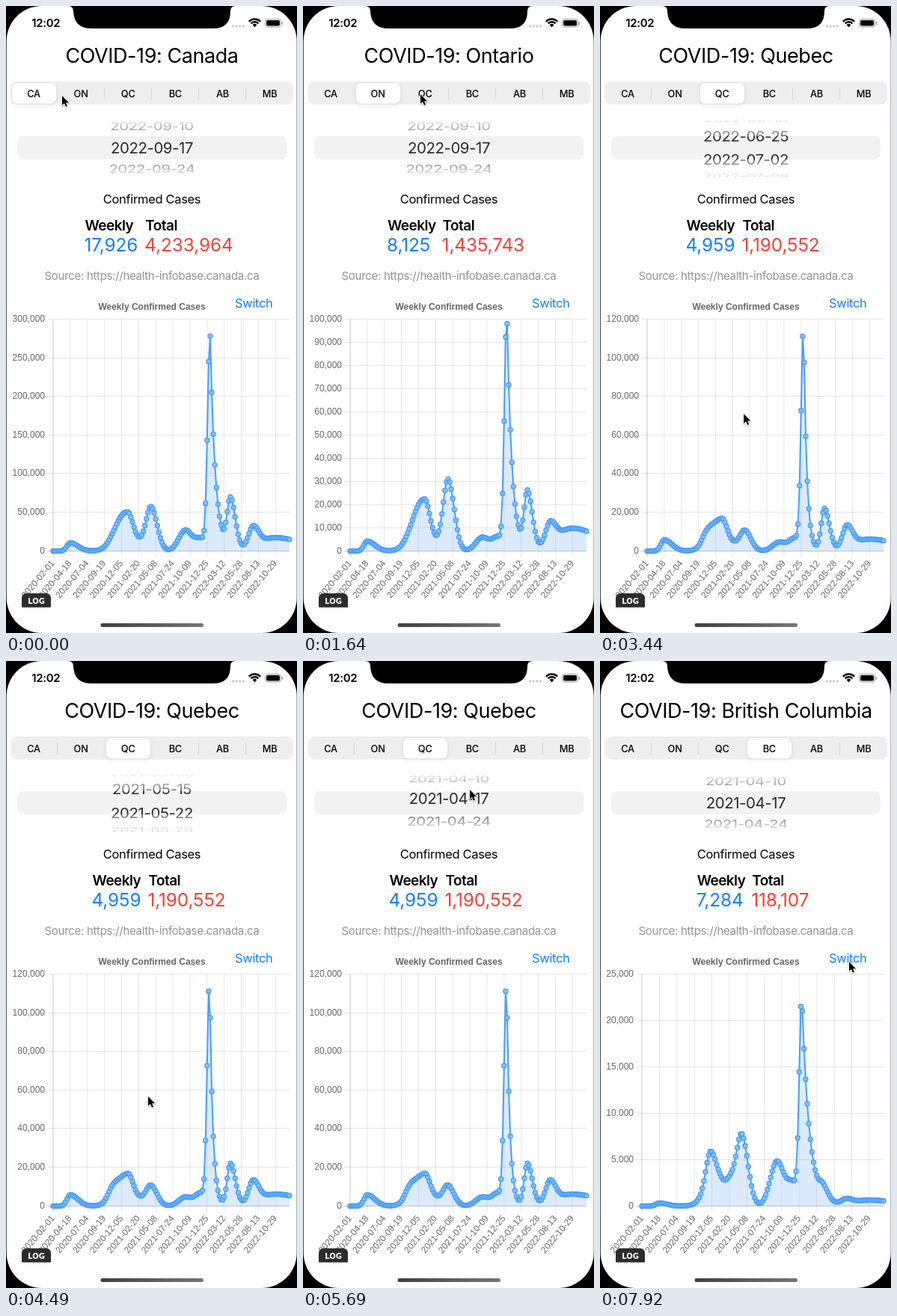
An HTML page with a canvas for the animation above (8 s loop, 389 by 838 pixels).

```html
<!DOCTYPE html>
<html lang="en">
<head>
<meta charset="utf-8">
<title>Case tracker</title>
<style>
html, body { margin: 0; width: 100%; height: 100%; overflow: hidden; background: #000; }
canvas { display: block; }
</style>
</head>
<body>
<canvas id="stage" width="389" height="838"></canvas>
<script>
const ctx = document.getElementById('stage').getContext('2d');
const UI = 'Inter, sans-serif', PLOT = '"Liberation Sans", Arial, sans-serif';
const BLUE = '#157efb', RED = '#f0433a', GRID = 'rgba(0,0,0,.1)', AXIS = 'rgba(0,0,0,.22)';
const WEEKS = 152, TOP = 419, BOTTOM = 728.5, RIGHT = 379;

// Outbreak waves shared by all regions: peak week, rise and fall widths.
const waves = [[11, 3, 7], [38, 4, 5], [43, 4, 5], [48, 10, 5], [56, 5, 6], [63, 4.5, 5.5],
  [85, 6, 6], [95, 5, 6], [114, 3, 4.5], [128.5, 4, 5], [143, 16, 24]];

// heights: one per wave, in pixels; spike: peak week, height and decay of the winter surge.
const regions = [
  { name: 'Canada', max: 3e5, ticks: 6, left: 63, start: -500, gain: 1.073,
    heights: [11, 4, 4, 50, 10, 57, 28, 16, 66, 26, 18], spike: [100.9, 290, 3.3] },
  { name: 'Ontario', max: 1e5, ticks: 10, left: 63, start: 735, gain: 2.04,
    heights: [6.5, 2, 2, 33, 4, 46, 9, 9, 37, 13, 15], spike: [100.8, 155, 3.2] },
  { name: 'Quebec', max: 12e4, ticks: 6, left: 63, start: 1940, gain: 1,
    heights: [15, 12, 0, 43, 8, 26, 12, 17, 56, 28, 16], spike: [100.6, 300, 2] },
  { name: 'British Columbia', max: 25e3, ticks: 5, left: 56, start: 7150, gain: 1,
    heights: [4, 3, 50, 28, 34, 88, 60, 30, 14, 6, 8], spike: [100.6, 272, 4.8] },
];
const thumbStarts = [650, 1780, 6914], titleStarts = [700, 1850, 6960];
const readings = [[-99, '17,926', '4,233,964'], [700, '8,125', '1,435,743'], [1850, '4,959', '1,190,552'],
  [6130, '10,472', '334,071'], [6960, '7,284', '118,107']];
// Pointer moves: start, end, destination.
const moves = [[0, 440, 92, 117], [1100, 1640, 157, 118], [1930, 2240, 213, 199], [3000, 3544, 190, 582],
  [4560, 5240, 223, 172], [6200, 6700, 225, 128], [7250, 7920, 333, 402]];

const clamp = x => Math.max(0, Math.min(1, x));
const smooth = x => x * x * (3 - 2 * x);
const easeOut = (x, power) => 1 - (1 - clamp(x)) ** power;
const weekDate = (from, n) => new Date(from + n * 6048e5).toISOString().slice(0, 10);
const countPast = (starts, t) => starts.filter(s => t >= s).length;

// Draws a string and returns its width.
function text(str, x, y, size, { color = '#000', weight = 400, align = 'left', font = UI, track = -.02, base = 'alphabetic' } = {}) {
  ctx.font = `${weight} ${size}px ${font}`;
  ctx.letterSpacing = `${font === UI ? size * track : 0}px`;
  ctx.textAlign = align;
  ctx.textBaseline = base;
  ctx.fillStyle = color;
  ctx.fillText(str, x, y);
  return ctx.measureText(str).width;
}

function box(x, y, w, h, r, color) {
  ctx.beginPath();
  ctx.roundRect(x, y, w, h, r);
  ctx.fillStyle = color;
  ctx.fill();
}

function line(x1, y1, x2, y2, color) {
  ctx.beginPath();
  ctx.moveTo(x1, y1);
  ctx.lineTo(x2, y2);
  ctx.strokeStyle = color;
  ctx.lineWidth = 1;
  ctx.stroke();
}

function gradient(x0, y0, x1, y1, from, to) {
  const fill = ctx.createLinearGradient(x0, y0, x1, y1);
  fill.addColorStop(0, from);
  fill.addColorStop(1, to);
  return fill;
}

function drawStatus() {
  ctx.fillStyle = '#000';
  ctx.fill(new Path2D('M83 0Q90 0 90 7Q91 30 114 30H277Q300 30 300 7Q300 0 307 0Z'));
  text('12:02', 53.3, 28, 15, { weight: 600, align: 'center' });
  for (let i = 0; i < 4; i++) box(302 + i * 4.6, 25.5, 3, 3, 1, '#c8c8c8');
  ctx.strokeStyle = '#000';
  ctx.lineWidth = 2.4;
  for (const r of [10.5, 6.7]) {
    ctx.beginPath();
    ctx.arc(332.5, 28, r, -Math.PI * .76, -Math.PI * .24);
    ctx.stroke();
  }
  ctx.beginPath();
  ctx.moveTo(332.5, 28.5);
  ctx.arc(332.5, 28, 4, -Math.PI * .75, -Math.PI * .25);
  ctx.fillStyle = '#000';
  ctx.fill();
  ctx.beginPath();
  ctx.roundRect(346.5, 17.5, 21, 10.5, 3);
  ctx.strokeStyle = '#999';
  ctx.lineWidth = 1;
  ctx.stroke();
  box(348, 19, 18, 7.5, 1.8, '#000');
  box(368.7, 21, 1.4, 4, .7, '#999');
}

function drawSegments(t) {
  const thumb = thumbStarts.reduce((sum, s) => sum + easeOut((t - s) / 400, 3), 0);
  const selected = countPast(thumbStarts, t);
  box(6.5, 101, 377.5, 30.5, 8, '#eeeeef');
  for (let i = 1; i < 6; i++)
    if (i !== selected && i !== selected + 1) line(5.5 + 63 * i, 109, 5.5 + 63 * i, 125, '#d5d5d7');
  ctx.save();
  ctx.shadowColor = 'rgba(0,0,0,.11)';
  ctx.shadowBlur = 5;
  ctx.shadowOffsetY = 1.5;
  box(8 + 63 * thumb, 103, 59, 27.5, 7, '#fff');
  ctx.restore();
  ['CA', 'ON', 'QC', 'BC', 'AB', 'MB'].forEach((s, i) =>
    text(s, 37 + 63.1 * i, 121.5, 12.8, { weight: 500, align: 'center' }));
}

// A flick: thirteen rows of dragging, then exponential slowing.
function pickerPosition(t) {
  if (t < 3544) return -13 * smooth(clamp((t - 3050) / 494));
  return t < 6130 ? -74 + 4.57 * Math.exp((4490 - t) / 365) : -74;
}

function drawPicker(t) {
  const pos = pickerPosition(t), mid = 189.5, radius = 40, turn = .8;
  box(15, 174, 360, 31, 8, '#f2f2f2');
  ctx.save();
  ctx.beginPath();
  ctx.rect(100, 152, 190, 75.5);
  ctx.clip();
  for (let i = Math.round(pos) - 2; i <= Math.round(pos) + 2; i++) {
    const angle = (i - pos) * turn;
    if (Math.abs(angle) > 1.5) continue;
    ctx.save();
    ctx.translate(195, mid + radius * Math.sin(angle));
    ctx.scale(1, Math.cos(angle));
    text(weekDate(Date.UTC(2022, 8, 17), i), 0, 7.3, 20.4, { color: '#29292b', align: 'center' });
    ctx.restore();
  }
  for (const [edge, inner] of [[150, 174], [229, 205]]) {
    ctx.fillStyle = gradient(0, edge, 0, inner, 'rgba(255,255,255,.97)', 'rgba(255,255,255,.3)');
    ctx.fillRect(100, Math.min(edge, inner), 190, 24);
  }
  ctx.restore();
}

// Two left-aligned columns, centred together.
function drawTotals(t) {
  const [, weekly, total] = readings.findLast(row => t >= row[0]);
  const column = (head, number, x, color) => Math.max(
    text(head, x, 300, 19, { weight: 600, track: -.03 }),
    text(number, x - 1, 328, 24.4, { color, track: -.005 }));
  const gap = 9;
  ctx.save();
  ctx.globalAlpha = 0;
  const width = column('Weekly', weekly, 0) + gap + column('Total', total, 0);
  ctx.restore();
  const x = 205 - width / 2;
  column('Total', total, x + column('Weekly', weekly, x, BLUE) + gap, RED);
  text('Confirmed Cases', 195, 263.5, 16.5, { align: 'center' });
  text('Source: https://health-infobase.canada.ca', 195, 366, 15, { color: '#929296', align: 'center' });
}

function casesAt({ heights, spike: [peak, size, decay] }, week) {
  const past = week - peak;
  const surge = size * Math.exp(past < 0 ? -((past / 2.2) ** 2) : -past / decay);
  return waves.reduce((sum, [center, rise, fall], i) => {
    const d = week - center;
    return sum + heights[i] * Math.exp(-((d / (d < 0 ? rise : fall)) ** 2));
  }, surge);
}

function drawChart(t) {
  const region = regions.findLast(r => t >= r.start);
  const { max, ticks, left, gain, start } = region;
  const label = { font: PLOT, color: '#666', align: 'right', base: 'middle' };
  const xAt = week => left + (RIGHT - left) * week / WEEKS;
  text('Weekly Confirmed Cases', 195, 406, 12, { ...label, weight: 700, align: 'center', base: 'alphabetic' });
  text('Switch', 306, 403, 16.5, { color: BLUE });

  for (let i = 0; i <= ticks; i++) {
    const y = Math.round(BOTTOM - (BOTTOM - TOP) * i / ticks) - .5;
    line(left - 8, y, RIGHT, y, i ? GRID : AXIS);
    text((max * i / ticks).toLocaleString('en-US'), left - 11, y + .5, 12, label);
  }
  for (let week = 0; week < WEEKS; week += 11) {
    const x = xAt(week);
    line(x, TOP, x, BOTTOM + 8, week ? GRID : AXIS);
    ctx.save();
    ctx.translate(x, 743);
    ctx.rotate(-50 * Math.PI / 180);
    text(weekDate(Date.UTC(2020, 1, 1), week), 0, 0, 12, label);
    ctx.restore();
  }

  const grow = gain * easeOut((t - start) / 1000, 4);
  const points = Array.from({ length: WEEKS + 1 }, (_, w) => [xAt(w), BOTTOM - casesAt(region, w) * grow]);
  const path = new Path2D();
  points.forEach(([x, y]) => path.lineTo(x, y));
  const area = new Path2D(path);
  area.lineTo(RIGHT, BOTTOM);
  area.lineTo(left, BOTTOM);
  ctx.fillStyle = 'rgba(74,156,246,.2)';
  ctx.fill(area);
  ctx.strokeStyle = '#4a9cf6';
  ctx.lineJoin = 'round';
  ctx.lineWidth = 2;
  ctx.stroke(path);
  ctx.fillStyle = 'rgba(140,193,250,.85)';
  ctx.lineWidth = 1.4;
  for (const [x, y] of points) {
    ctx.beginPath();
    ctx.arc(x, y, 3, 0, 7);
    ctx.fill();
    ctx.stroke();
  }
}

function drawPointer(t) {
  let x = 75, y = 120;
  for (const [from, to, endX, endY] of moves) {
    const p = smooth(clamp((t - from) / (to - from)));
    x += (endX - x) * p;
    y += (endY - y) * p;
  }
  const arrow = new Path2D('M0 0V14.6L3.4 11.6L5.8 17L8.2 16L5.9 10.7H10.6Z');
  ctx.save();
  ctx.translate(x, y);
  ctx.scale(.86, .86);
  ctx.shadowColor = 'rgba(0,0,0,.3)';
  ctx.shadowBlur = 2;
  ctx.shadowOffsetY = 1;
  ctx.strokeStyle = '#fff';
  ctx.lineWidth = 2;
  ctx.stroke(arrow);
  ctx.shadowColor = 'transparent';
  ctx.fillStyle = '#000';
  ctx.fill(arrow);
  ctx.restore();
}

function draw() {
  const now = performance.now() % 8000;
  const t = now >= 7920 ? 7920 : Math.floor((now + 10) / 150) * 150 - 10;
  ctx.fillStyle = '#000';
  ctx.fillRect(0, 0, 389, 838);
  box(.7, 0, 388, 838, 47, '#fff');
  drawStatus();
  const { name } = regions[countPast(titleStarts, t)];
  text('COVID-19: ' + name, 195, 76, 27, { align: 'center', track: -.016 });
  drawSegments(t);
  drawPicker(t);
  drawTotals(t);
  drawChart(t);
  box(21, 785, 39, 18.7, [6, 6, 1, 1], '#2c2c2c');
  text('LOG', 40.7, 799, 10, { color: '#fff', weight: 700, align: 'center', font: '"DejaVu Sans", sans-serif' });
  box(126.5, 825, 137.5, 5, 2.5, gradient(127, 0, 264, 0, '#404040', '#777'));
  drawPointer(t);
  requestAnimationFrame(draw);
}
draw();
</script>
</body>
</html>
```
